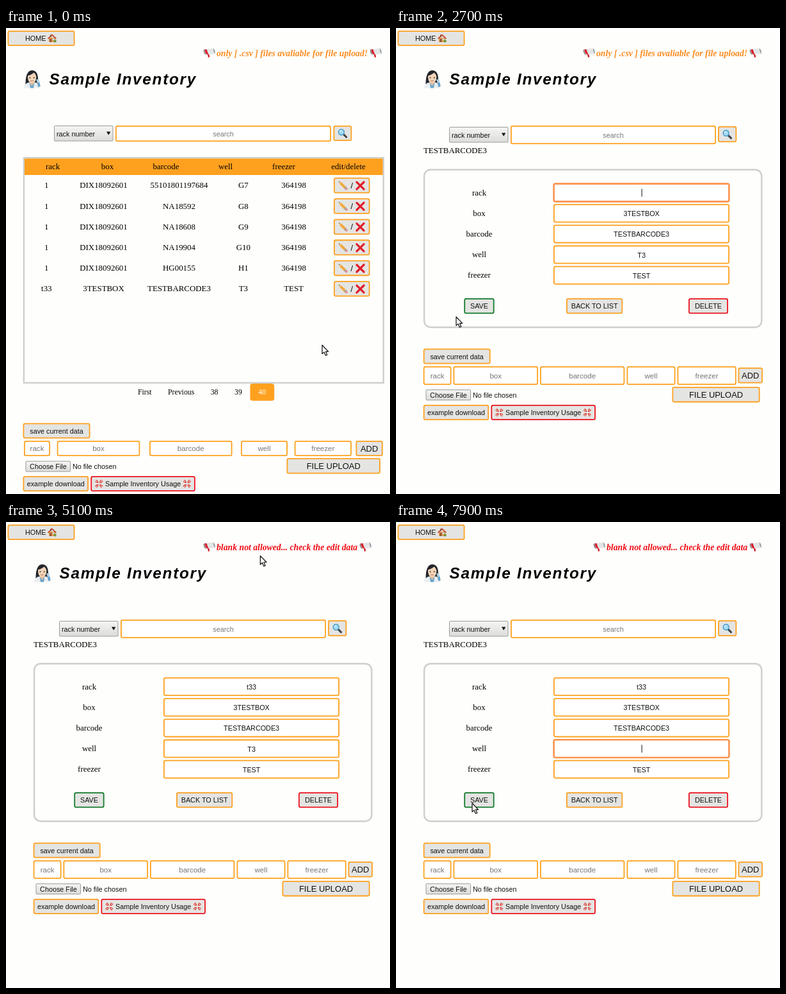
Animation of 600x726 px, one loop 8 s. Source, as an HTML page:

```html
<!DOCTYPE html>
<html lang="en">
<head>
<meta charset="utf-8">
<title>Sample Inventory</title>
<style>
  html, body { margin: 0; width: 100%; height: 100%; overflow: hidden; background: #fefefc; }
  svg { display: block; width: 600px; height: 726px; }
  text { white-space: pre; }
  .sans { font-family: "Liberation Sans", Arial, sans-serif; }
  .serif { font-family: "Liberation Serif", "Times New Roman", serif; }
  .ui { font-family: "Noto Sans", "Open Sans", sans-serif; }
</style>
</head>
<body>
<svg id="stage" viewBox="0 0 600 726" xmlns="http://www.w3.org/2000/svg"></svg>
<script>
const LOOP = 8000, STEP = 100, ROW = 32.2;
const ORANGE = '#ffa11f', FACE = '#e4e4e2', GRAY = '#cfcfcd', RED = '#ec1420', GREEN = '#137a2c', FOCUS = '#fa934e';
const stage = document.getElementById('stage');

// ---- drawing helpers ----
const at = (x, y, body) => `<g transform="translate(${x} ${y})">${body}</g>`;
const shape = (d, fill, extra = '') => `<path d="${d}" fill="${fill}" ${extra}/>`;

function text(s, x, y, o = {}) {
  const { size = 10.8, face = 'sans', fill = '#111', mid = false, more = '' } = o;
  return `<text class="${face}" x="${x}" y="${y}" font-size="${size}" fill="${fill}"` +
    `${mid ? ' text-anchor="middle"' : ''} ${more}>${s}</text>`;
}
const centred = (s, x, y, o = {}) => text(s, x, y, { ...o, mid: true });
const serif = (s, x, y, o = {}) => text(s, x, y, { size: 12.9, face: 'serif', fill: '#000', ...o });

// Rectangle given by its outer edges; the stroke lies inside them.
function box(l, t, r, b, o = {}) {
  const { fill = '#fff', line = ORANGE, w = 1.8, round = 2.4 } = o;
  return `<rect x="${l + w / 2}" y="${t + w / 2}" width="${r - l - w}" height="${b - t - w}" rx="${round}" ` +
    `fill="${fill}" stroke="${line}" stroke-width="${w}"/>`;
}
const fillRect = (l, t, r, b, fill) => `<rect x="${l}" y="${t}" width="${r - l}" height="${b - t}" fill="${fill}"/>`;
const button = (l, t, r, b, label, o = {}) =>
  box(l, t, r, b, { fill: FACE, ...o }) +
  centred(label, (l + r) / 2, (t + b) / 2 + (o.size ? 4.5 : 4.2), { size: o.size || 10.8 });
const field = (l, t, r, b, hint, size = 11.6) =>
  box(l, t, r, b) + centred(hint, (l + r) / 2, (t + b) / 2 + 4, { size, fill: '#777' });

// ---- small pictures ----
const house = shape('M-5-1H5V6H-5Z', '#e39a54') + shape('M-7 0L0-6.5L7 0L5.8 1.2L0-4L-5.8 1.2Z', '#c4462c') +
  shape('M-3-5.5H-1V-2H-3Z', '#8d4a35') + shape('M-3.5 1H-.8V6H-3.5Z', '#8a5030') +
  shape('M.8 .5H3.6V3H.8Z', '#bfe3f2') + '<circle cx="4.6" cy="4.4" r="2.2" fill="#6f9a37"/>';

const horn = shape('M-3.4 1L-1 .6L.3 6.2L-2 7Z', '#d5202c') +
  shape('M-7.5-5.5L6-7.5L8.5 1.5L-4.5 2Z', '#e3e5e6') +
  shape('M-7.5-5.5L-4.6-6L-1.8 1.9L-4.5 2Q-7.6-.6-7.5-5.5Z', '#d5202c') +
  shape('M6-7.5Q9.4-3.6 8.5 1.5Q5.8-2.4 6-7.5Z', '#858b90') +
  shape('M-8.3-5.4Q-9.3-1-5.6 2.4', 'none', 'stroke="#55595c" stroke-width="1.1"');

const scientist =
  shape('M-10 13Q-11-13 0-13.5Q10-13.5 9.5 2L10 9H-9Z', '#22252b') +
  shape('M-13 14Q-12 6-3 5H4Q12 6 13 14Z', '#e9eef1') +
  shape('M-3 4H3V7L0 10L-3 7Z', '#dfb490') + shape('M-4 6L0 10.5L4 6L2.5 14H-2.5Z', '#6ba4c8') +
  shape('M-6.5-5Q0-7 3-10Q6-8 6.8-4Q7 6 0 6.2Q-7 6-6.5-5Z', '#f3d4b8') +
  '<circle cx="-3" cy="-2" r="1" fill="#333"/><circle cx="3.2" cy="-2" r="1" fill="#333"/>' +
  shape('M-2.2 2.3Q0 4 2.2 2.3', 'none', 'stroke="#b55a4c" stroke-width="1"') +
  shape('M7 1L10 0L13 11L10 12.5Z', '#b8d7e6', 'stroke="#8aa9ba" stroke-width=".6"') +
  shape('M8.6 6L11.6 5.4L12.8 11L10.2 12Z', '#5b9fd0');

const lens = shape('M1.5 1.5L6 6', 'none', 'stroke="#3e4347" stroke-width="3" stroke-linecap="round"') +
  '<circle cx="-1.8" cy="-1.8" r="4.4" fill="#a6dcf5" stroke="#4b9fcc" stroke-width="1.6"/>' +
  shape('M-4.3-2.3Q-3.6-4.6-1.4-4.6', 'none', 'stroke="#fff" stroke-width="1"');

const pencil = shape('M-7-6.6L-2.8-5.4L5.2 2.6L2.4 5.4L-5.6-2.6Z', '#f2a93b') +
  shape('M-7-6.6L-2.8-5.4L-5.6-2.6Z', '#e8c99a') + shape('M-7-6.6L-5.3-6.1L-6.4-4.9Z', '#333') +
  shape('M3.8 1.2L5.2 2.6L2.4 5.4L1 4Z', '#9aa7ad') + shape('M5.2 2.6L7 4.4Q7 6.8 4.2 7L2.4 5.4Z', '#e58d8d');

const cross = shape('M-5.6-5.4L5.6 5.6M5.6-5.6L-5.6 5.6', 'none', 'stroke="#e01e2b" stroke-width="3.2" stroke-linecap="round"');

const anger = [0, 90, 180, 270].map(a =>
  `<path transform="rotate(${a})" d="M-4.6-5.6Q-1.4-4.6-1.6-1.6Q-4.4-1.4-5.6-4" fill="none" stroke="#dd3f35" stroke-width="1.3"/>`).join('');

const arrow = shape('M0 0V13.6L3.1 10.9L5.4 16.2L7.8 15.2L5.5 10.1H9.7Z', '#fff',
  'stroke="#111" stroke-width="1.2" stroke-linejoin="round"');

const BEAM = 'M-2.6-6.6Q0-6.6 0-5Q0-6.6 2.6-6.6M0-5.5V5.5M-2.6 6.6Q0 6.6 0 5Q0 6.6 2.6 6.6';
const beam = shape(BEAM, 'none', 'stroke="#fff" stroke-width="3"') + shape(BEAM, 'none', 'stroke="#111" stroke-width="1.4"');

// ---- shared page parts ----
const masthead = x => button(2.5, 4, 107.5, 28, '') + text('HOME', 30, 20) + at(72, 16, house) +
  at(x + 13.5, 79.5, scientist) +
  text('Sample Inventory', x + 40.5, 87.6,
    { size: 24.3, fill: '#000', more: 'font-weight="700" font-style="italic" letter-spacing="1.75"' });

function notice(s, left, right, fill) {
  return at(left, 39, horn) + at(right, 39, horn) +
    serif(s, left + 11, 43.5, { size: 13.74, fill, more: 'font-weight="700" font-style="italic"' });
}
const CSV = 'only [ .csv ] files avaliable for file upload!';
const BLANK = 'blank not allowed... check the edit data';

const picker = (x, y) => box(x, y, x + 92.5, y + 24.5, { fill: 'url(#sheen)', line: '#9b9b9b', w: 1, round: 1 }) +
  text('rack number', x + 4, y + 16.6) + shape(`M${x + 82} ${y + 9.4}h6.4l-3.2 5.4z`, '#111');

const chooser = (x, y) => box(x, y, x + 70.5, y + 17, { fill: 'url(#sheen)', line: '#9b9b9b', w: 1, round: 1 }) +
  centred('Choose File', x + 35.4, y + 12.6) + text('No file chosen', x + 73.5, y + 12.6);

const usage = (x, y) => box(x, y, x + 163.5, y + 24, { fill: FACE, line: RED }) +
  at(x + 13, y + 12, anger) + at(x + 150.5, y + 12, anger) + text('Sample Inventory Usage', x + 22.7, y + 16.2);

const HINTS = ['rack', 'box', 'barcode', 'well', 'freezer'];
const entry = (edges, t, b) => HINTS.map((h, i) => field(edges[2 * i], t, edges[2 * i + 1], b, h)).join('');

// ---- list page ----
const SAMPLES = [
  ['1', 'DIX18092601', '55101801197684', 'G7', '364198'],
  ['1', 'DIX18092601', 'NA18592', 'G8', '364198'],
  ['1', 'DIX18092601', 'NA18608', 'G9', '364198'],
  ['1', 'DIX18092601', 'NA19904', 'G10', '364198'],
  ['1', 'DIX18092601', 'HG00155', 'H1', '364198'],
  ['t33', '3TESTBOX', 'TESTBARCODE3', 'T3', 'TEST']
];
const HEAD_X = [73, 158.5, 250, 343, 434, 535], CELL_X = [63.3, 152.5, 270.5, 370.8, 449.6];

function sampleRow(cells, i, hover, focus) {
  const y = 233 + ROW * i;
  return (hover ? fillRect(29, y - 3.5, 589, y + 28.6, GRAY) : '') +
    cells.map((c, k) => serif(c, CELL_X[k], y + 16.3, { mid: true })).join('') +
    box(512, y, 568.6, y + 24.6, { fill: FACE, line: focus ? FOCUS : ORANGE, w: focus ? 2.4 : 1.8 }) +
    at(527, y + 12.6, pencil) + centred('/', 540.4, y + 17, { size: 13 }) + at(553.6, y + 12.6, cross);
}

function listPage(t, p) {
  const hovered = Math.floor((p.y - 229.5) / ROW);
  const page = (s, x) => serif(s, x, 571, { size: 11.8 });
  return masthead(27) + notice(CSV, 318, 578, '#fb8c22') +
    picker(75, 152) + field(171, 152, 508, 177, 'search', 10.8) +
    button(511.5, 152, 540.3, 176, '') + at(525.8, 164, lens) +
    box(26.7, 201, 591, 554, { line: GRAY, w: 2.4, round: 0, fill: '#fefefc' }) +
    fillRect(29, 203.4, 588.7, 229, ORANGE) +
    [...HINTS, 'edit/delete'].map((h, i) => serif(h, HEAD_X[i], 220, { mid: true })).join('') +
    SAMPLES.map((r, i) => sampleRow(r, i, i === hovered, i === 5 && t >= 600)).join('') +
    page('First', 206) + page('Previous', 253) + page('38', 319.7) + page('39', 357) +
    `<rect x="381.4" y="554" width="37.8" height="26.8" rx="4" fill="${ORANGE}"/>` +
    serif('40', 400.2, 571, { size: 11.8, fill: '#fff', mid: true }) +
    button(26.5, 615.5, 131.5, 639.5, 'save current data') +
    entry([28, 69, 79.7, 209.3, 224, 353.5, 367, 440, 450.7, 540], 643, 667) +
    button(546.5, 643, 588.8, 667, 'ADD', { size: 12.96 }) +
    chooser(30.5, 674.5) + button(438.5, 670, 585, 694.5, 'FILE UPLOAD', { size: 12.96 }) +
    button(26.5, 698, 129, 722, 'example download') + usage(132.3, 698);
}

// ---- edit page ----
const within = (t, a, b) => t >= a && t < b;
const fieldTop = i => 242 + ROW * i;

function suggestion(i, s) {
  const y = fieldTop(i) + 29.5;
  return `<rect x="246" y="${y}" width="275" height="42" rx="1.5" fill="#fff" stroke="#d2d2d2" stroke-width=".8" filter="url(#soft)"/>` +
    text(s, 256, y + 26.2, { size: 13.3, face: 'ui', fill: '#222', more: 'font-weight="500"' });
}

function editPage(t) {
  const values = [within(t, 2300, 4400) ? '' : 't33', '3TESTBOX', 'TESTBARCODE3', t >= 7300 ? '' : 'T3', 'TEST'];
  const active = within(t, 1400, 3000) ? 0 : t >= 6600 ? 3 : -1;
  const picked = within(t, 2100, 2300) || within(t, 7100, 7300);
  const popup = within(t, 1500, 1700) || within(t, 6700, 6900);

  const rows = values.map((v, i) => {
    const y = fieldTop(i), on = i === active, g = on ? .7 : 0;
    const half = v ? (i ? 6.8 : 8.2) : 0;
    let s = serif(HINTS[i], 130, y + 18.5, { mid: true }) +
      box(246 - g, y - g, 521 + g, y + 29 + g, { line: on ? FOCUS : ORANGE, w: on ? 2.6 : 1.8 });
    if (on && picked) s += fillRect(383.6 - half, y + 9, 383.6 + half, y + 22, '#f07746');
    s += centred(v, 383.6, y + 18.9, { fill: on && picked ? '#fff' : '#111' });
    if (on && !picked) s += fillRect(383.6 + half, y + 8.6, 384.6 + half, y + 20.8, '#111');
    if (on && v && !i && !picked)
      s += shape(`M375.6 ${y + 21}` + 'q1 -1.8 2 0t2 0'.repeat(4), 'none', 'stroke="#e33" stroke-width=".8"');
    return s;
  }).join('');

  const asked = within(t, 3000, 4400);
  return masthead(43) +
    (t < 4400 ? notice(CSV, 302, 562, '#fb8c22') : notice(BLANK, 318, 562, '#f00c14')) +
    picker(83, 154) + field(179, 152, 500, 181, 'search', 10.8) +
    button(503, 153, 532.3, 178, '') + at(517.5, 165.6, lens) +
    serif('TESTBARCODE3', 43, 195) +
    box(42.8, 219.5, 572.6, 467.4, { fill: '#fefefc', line: GRAY, w: 2.5, round: 10 }) + rows +
    button(106.3, 421, 153.6, 445.3, 'SAVE', { line: GREEN }) +
    (asked ? box(108, 422.6, 152, 443.7, { fill: 'none', line: '#d98a62', w: .8, round: 1.5 }) : '') +
    button(266, 421, 354.2, 445.3, 'BACK TO LIST') +
    button(457, 421, 519, 445.3, 'DELETE', { line: RED }) +
    button(42.7, 499.5, 147.6, 523.5, 'save current data') +
    entry([42.7, 86.5, 89.5, 222, 225, 357.3, 360.5, 436.5, 439.5, 531.7], 527, 556) +
    button(534.5, 529, 573, 553.5, 'ADD', { size: 12.96 }) +
    chooser(46.5, 563.2) + button(431.5, 559, 568.6, 583.4, 'FILE UPLOAD', { size: 12.96 }) +
    button(42.7, 587, 145.2, 611, 'example download') + usage(148.4, 587) +
    (popup ? suggestion(active, values[active]) : '');
}

function dialog(t) {
  if (!within(t, 3100, 4500)) return '';
  const alpha = t < 3200 ? .5 : t < 4300 ? 1 : t < 4400 ? .9 : .25;
  const bold = 'font-weight="600"';
  return `<g opacity="${alpha}">` +
    '<rect x="125" y="-20" width="364.5" height="92.3" rx="2" fill="#f0efee" stroke="#b9b6b2" filter="url(#soft)"/>' +
    text('Are you sure modify this?', 139, 15.6, { size: 12.4, face: 'ui', fill: '#5a5a58' }) +
    box(341, 32.8, 405.5, 59.3, { fill: '#f5f4f3', line: '#a9a6a2', w: 1.2, round: 3 }) +
    centred('Cancel', 373.4, 50, { size: 11.6, face: 'ui', fill: '#5a5a58', more: bold }) +
    box(411, 32.8, 476.6, 59.3, { fill: '#f68a67', line: '#ef7f58', w: 1.2, round: 3 }) +
    centred('OK', 443.2, 50, { size: 11.8, face: 'ui', fill: '#fff', more: bold }) + '</g>';
}

// ---- pointer: time / 100, x, y ----
const TRACK = [
  [0, 494, 494], [1, 495, 480], [4, 512, 425], [6, 530, 405], [7, 522, 402], [8, 494, 392], [9, 490, 380],
  [13, 418, 266], [14, 413, 260], [16, 413, 260], [17, 500, 262], [19, 500, 262], [21, 303, 262], [22, 303, 262],
  [24, 230, 360], [26, 105, 474], [27, 94, 450], [29, 118, 430], [32, 118, 429], [35, 300, 230], [38, 500, 70],
  [39, 547, 50], [40, 547, 48], [42, 446, 50], [43, 446, 50], [45, 440, 52], [46, 440, 52], [50, 326, 52],
  [53, 540, 54], [57, 352, 46], [61, 540, 42], [64, 470, 284], [67, 410, 354], [68, 410, 354], [70, 440, 355],
  [71, 330, 355], [72, 330, 355], [78, 122, 440], [79, 119, 438], [80, 119, 438]
];
function pointer(t) {
  const k = t / 100, i = TRACK.findIndex(p => p[0] > k);
  const a = TRACK[i - 1], b = TRACK[i], f = (k - a[0]) / (b[0] - a[0]);
  return { x: a[1] + (b[1] - a[1]) * f, y: a[2] + (b[2] - a[2]) * f };
}

const DEFS = '<defs><linearGradient id="sheen" x2="0" y2="1"><stop stop-color="#f5f5f4"/><stop offset="1" stop-color="#dcdcda"/></linearGradient>' +
  '<filter id="soft" x="-5%" y="-20%" width="110%" height="150%"><feDropShadow dx="0" dy="1" stdDeviation="1.2" flood-opacity=".3"/></filter></defs>';

function render(t) {
  const p = pointer(t), editing = t >= 900;
  const row = (p.y - 242) / ROW;
  const typing = editing && p.x > 246 && p.x < 521 && row >= 0 && row < 5 && row % 1 < .9;
  stage.innerHTML = DEFS + fillRect(0, 0, 600, 726, '#fefefc') +
    (editing ? editPage(t) : listPage(t, p)) + dialog(t) + at(p.x, p.y, typing ? beam : arrow);
}

let shown = -1;
function tick(now) {
  const t = Math.floor((now % LOOP) / STEP) * STEP;
  if (t !== shown) render(shown = t);
  requestAnimationFrame(tick);
}
render(0);
requestAnimationFrame(tick);
</script>
</body>
</html>
```
